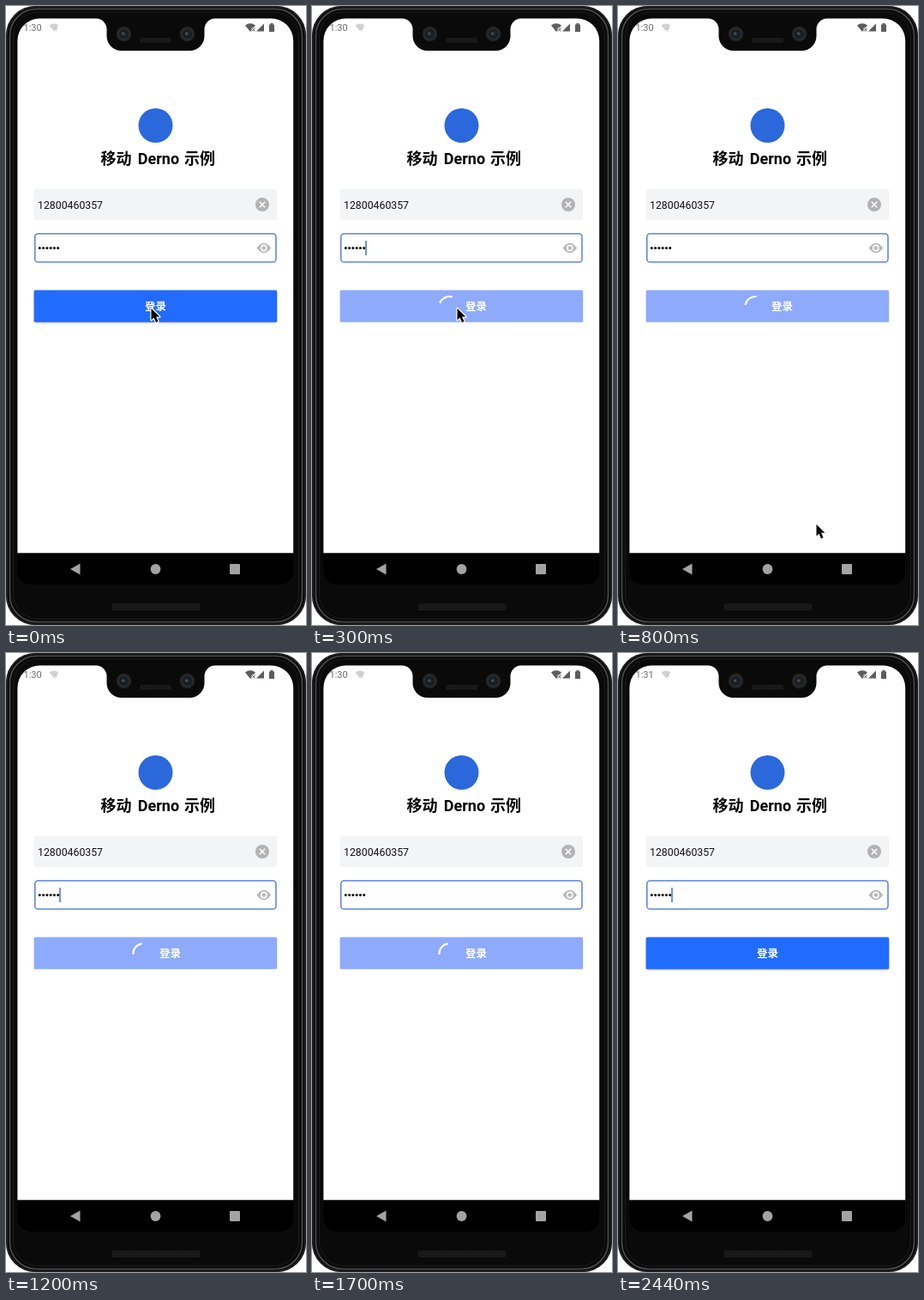
Recreate the animation shown at these times as an HTML page. Size 350x720 px, loop 2580 ms.

```html
<!DOCTYPE html>
<html lang="zh-CN">
<head>
<meta charset="utf-8">
<title>登录</title>
<style>
  html, body { margin: 0; width: 100%; height: 100%; overflow: hidden; background: #fff; }
  svg { display: block; width: 100%; height: 100%; }
  text { font-family: Roboto, "Noto Sans CJK SC", "Noto Sans CJK", sans-serif; }
  .title { font-size: 18px; font-weight: 700; fill: #050505; text-anchor: middle; }
  .cta { font-size: 12.5px; font-weight: 700; fill: #fff; text-anchor: middle; }
</style>
</head>
<body>
<svg viewBox="0 0 350 720">
  <defs>
    <radialGradient id="lens">
      <stop offset="0" stop-color="#28343d"/>
      <stop offset=".45" stop-color="#141a1f"/>
      <stop offset=".7" stop-color="#2a2c2e"/>
      <stop offset="1" stop-color="#1a1a1a"/>
    </radialGradient>
    <pattern id="mesh" width="2" height="2" patternUnits="userSpaceOnUse">
      <rect width="2" height="2" fill="#1c1c1c"/>
      <rect width="1" height="1" fill="#0d0d0d"/>
    </pattern>
    <filter id="soft" x="-5%" y="-20%" width="110%" height="150%">
      <feGaussianBlur stdDeviation="1"/>
    </filter>
  </defs>

  <!-- phone body -->
  <rect width="350" height="720" rx="34" fill="#0a0a0a"/>
  <g fill="none">
    <rect x="1" y="1" width="348" height="718" rx="33" stroke="#242424" stroke-width="1.500"/>
    <rect x="4.500" y="3.500" width="341" height="713" rx="31" stroke="#4c4c4c" stroke-width="1.600"/>
    <rect x="8.500" y="7" width="333" height="706" rx="29" stroke="#1c1c1c"/>
  </g>

  <!-- screen with notch -->
  <path fill="#fff" d="M13.400 636.400V40.500A26 26 0 0 1 39.400 14.500H105A12.500 12.500 0 0 1 117.500 27V35A17 17 0 0 0 134.500 52H214.500A17 17 0 0 0 231.500 35V27A12.500 12.500 0 0 1 244 14.500H309.200A26 26 0 0 1 335.200 40.500V636.400Z"/>
  <path fill="#000" d="M13.400 636.400H335.200V658A15 15 0 0 1 320.200 673H28.400A15 15 0 0 1 13.400 658Z"/>
  <circle cx="137.500" cy="32.500" r="9" fill="url(#lens)"/>
  <circle cx="211.500" cy="32.500" r="9" fill="url(#lens)"/>
  <circle cx="136.500" cy="32" r="1.500" fill="#465660"/>
  <circle cx="210.500" cy="32" r="1.500" fill="#465660"/>
  <rect x="156" y="37" width="37" height="6" rx="1.500" fill="url(#mesh)"/>
  <rect x="124" y="695.500" width="102" height="7" rx="1.500" fill="url(#mesh)" stroke="#1f1f1f" stroke-width=".7"/>

  <!-- status bar -->
  <text id="clock" x="20.500" y="29" font-size="11" fill="#6c6c6c">1:30</text>
  <path d="M50.500 22.500Q56 18.500 61.500 22.500L56 29.500Z" fill="#d2d2d2"/>
  <text x="56.500" y="29.500" font-size="7" fill="#aaa">?</text>
  <path d="M279 22.500Q285 18 291 22.500L285 30Z" fill="#5d5d5d"/>
  <path d="M287 25.500l3.500 4m0-4l-3.500 4" stroke="#fff" stroke-width="2.400"/>
  <path d="M287 25.500l3.500 4m0-4l-3.500 4" stroke="#5d5d5d"/>
  <path d="M292 29.500L301 20.500V29.500Z" fill="#5d5d5d"/>
  <path d="M307 21.500h1.500v-1.500h3v1.500h1.500v8.500h-6z" fill="#5d5d5d"/>

  <!-- heading -->
  <circle cx="174.500" cy="139" r="20" fill="#2b68dc"/>
  <text class="title" x="128.500" y="184">移动</text>
  <text class="title" x="178" y="184">Derno</text>
  <text class="title" x="226" y="184">示例</text>

  <!-- number field -->
  <rect x="32.600" y="212.700" width="283.600" height="36.300" rx="3" fill="#f3f4f6"/>
  <text x="37" y="235.500" font-size="12.300" fill="#111">12800460357</text>
  <circle cx="299" cy="231" r="8" fill="#b3b3b3"/>
  <path d="M295.800 227.800l6.400 6.400m0-6.400l-6.400 6.400" stroke="#fff" stroke-width="1.500"/>

  <!-- password field -->
  <rect x="33.800" y="264.900" width="281.200" height="33" rx="3.500" fill="#fff" stroke="#3f6dd2" stroke-width="1.300"/>
  <g id="dots" fill="#111"></g>
  <rect id="caret" x="62.300" y="273" width="1.400" height="17" fill="#2c66dc"/>
  <path d="M292.500 281.500Q300.800 270 309.200 281.500Q300.800 293 292.500 281.500Z" fill="#b9b9b9"/>
  <circle cx="300.800" cy="281.500" r="3.900" fill="#fff"/>
  <circle cx="300.800" cy="281.500" r="2.300" fill="#b9b9b9"/>

  <!-- button -->
  <rect id="shade" x="33" y="332.500" width="283" height="36" rx="2" fill="#000" opacity=".3" filter="url(#soft)"/>
  <rect id="button" x="32.600" y="330.600" width="283.600" height="37.200" rx="1.500"/>
  <text id="label" class="cta" y="354">登录</text>
  <circle id="spinner" r="12" fill="none" stroke="#fff" stroke-width="2.200" pathLength="360" stroke-dasharray="84 276"/>

  <!-- navigation -->
  <g fill="#a3a3a3">
    <path d="M75 655L86.500 648.500V661.500Z"/>
    <circle cx="174.500" cy="655" r="5.900"/>
    <rect x="261" y="649" width="12" height="12" rx="1"/>
  </g>

  <path id="pointer" d="M0 0V13.600L3.100 10.700L5.500 16.400L8 15.300L5.600 9.800H9.800Z" fill="#000" stroke="#fff" stroke-width="2.400" stroke-linejoin="round" paint-order="stroke"/>
</svg>
<script>
const LOOP = 2580;
const $ = id => document.getElementById(id);

// [time, x, y]
const path = [
  [0, 169.5, 351.7], [300, 169.5, 351.7], [400, 177, 385], [500, 195, 460],
  [600, 213, 540], [700, 223, 576], [800, 231.5, 603], [900, 242, 630],
  [1000, 260, 668], [1100, 284, 710], [1200, 300, 745]
];
// [time, degrees]
const spin = [[100, 58], [300, 202], [800, 551], [1200, 897], [2200, 1617]];

// linear interpolation of one column of a table
function at(table, t, col = 1) {
  const last = table.length - 1;
  if (t >= table[last][0]) return table[last][col];
  const i = Math.max(1, table.findIndex(row => row[0] > t));
  const a = table[i - 1], b = table[i];
  const k = Math.max(0, (t - a[0]) / (b[0] - a[0]));
  return a[col] + (b[col] - a[col]) * k;
}

const show = (id, on) => $(id).setAttribute('visibility', on ? 'visible' : 'hidden');

function draw(ms) {
  const t = ms >= 2440 ? 2440 : Math.min(2300, Math.floor(ms / 100) * 100);
  const busy = t >= 100 && t < 2300;

  $('button').setAttribute('fill', busy ? '#8eaafa' : '#226bff');
  $('label').setAttribute('x', busy ? 191.5 : 174.5);
  show('shade', !busy);
  show('spinner', busy);
  $('spinner').setAttribute('transform', `translate(160.3 350) rotate(${at(spin, t)})`);

  show('caret', t >= 100 && Math.floor((t - 100) / 500) % 2 === 0);
  show('pointer', t < 1200);
  $('pointer').setAttribute('transform', `translate(${at(path, t)} ${at(path, t, 2)})`);
  $('clock').textContent = t < 2440 ? '1:30' : '1:31';
}

$('dots').innerHTML = Array.from({ length: 6 }, (_, i) =>
  `<circle cx="${39.3 + i * 4.28}" cy="281.500" r="1.550"/>`).join('');

const start = performance.now();
function tick() {
  draw((performance.now() - start) % LOOP);
  requestAnimationFrame(tick);
}
tick();
</script>
</body>
</html>
```
